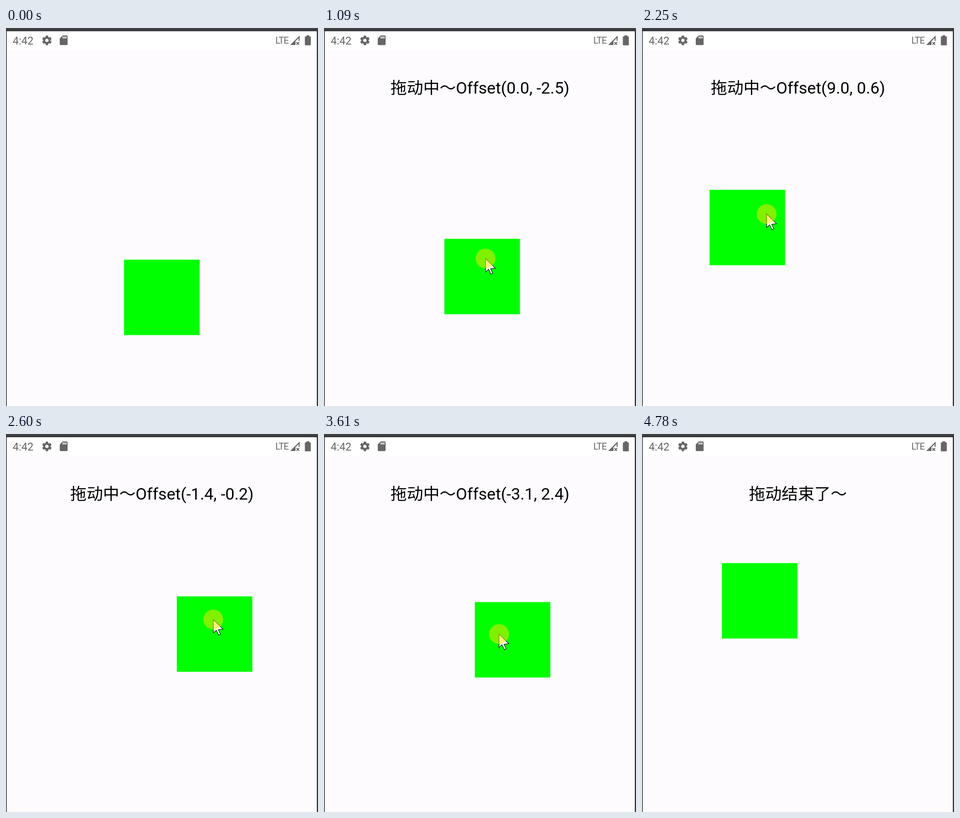
Animation, 679 px wide and 824 px high, one loop 5.64 s. Source, as an HTML page with a canvas:

```html
<!DOCTYPE html>
<html lang="zh-CN">
<head>
<meta charset="utf-8">
<title>Drag demo</title>
<style>
  html, body { margin: 0; width: 100%; height: 100%; overflow: hidden; background: #fdfbfe; }
  canvas { display: block; width: 679px; height: 824px; }
</style>
</head>
<body>
<canvas id="stage" width="679" height="824"></canvas>
<script>
const ctx = document.getElementById('stage').getContext('2d');
const LOOP = 5640, START = 190, STEP = 68.5;
const SIZE = 164.4, GREY = '#666666';
const PACE = 6.75;    // pixels per step for each unit of reported offset
const LEAD = 0.55;    // steps by which the pointer runs ahead of the box

const first = { from: 11, to: 38, grip: [85, 51] };
const second = { from: 47, to: 62, grip: [66, 59] };

// Turning points of the box: step, x, y and the reported drag offset there.
const path = [
  [11, 257, 505, 0, 0],
  [13, 262, 459.6, 0, -2.5],
  [17.3, 365, 408, 0, -2.8],
  [22, 149, 328, -9.3, -0.5],
  [25, 71, 333, 0, 1],
  [27, 71, 338, 0, 0.5],
  [30, 147, 352.7, 9, 0.6],
  [33.5, 380, 355, 0, 0],
  [38, 348, 351, 0, 0],
  [47, 348, 351, 0, 0],
  [50, 301, 388, -5, 4],
  [53, 201, 417, -3, -1],
  [55, 203, 356, 3, -3.7],
  [62, 174, 281.4, 0, 0]
];

// Cubic Hermite curve through the turning points.
function boxAt(n) {
  const next = path.findIndex(key => key[0] > n);
  if (next < 0) return path[path.length - 1].slice(1, 3);
  if (next === 0) return path[0].slice(1, 3);
  const a = path[next - 1], b = path[next];
  const span = b[0] - a[0], u = (n - a[0]) / span, s = u * u * (3 - 2 * u);
  return [1, 2].map(k => a[k] * (1 - s) + b[k] * s +
    span * PACE * u * (1 - u) * ((1 - u) * a[k + 2] - u * b[k + 2]));
}

const mix = (a, b, u) => a.map((v, k) => v + (b[k] - v) * u);
const clamp = u => Math.max(0, Math.min(1, u));

function held(drag, n) {
  const ahead = Math.min(n + LEAD, drag.to);
  return boxAt(ahead).map((v, k) => v + drag.grip[k]);
}

function pointerAt(n) {
  if (n < first.from) {
    return mix([541, 812], held(first, first.from), 1 - (1 - n / first.from) ** 1.5);
  }
  if (n < second.from) {
    const reach = clamp((n - second.from + 2) / 2);
    return mix(held(first, n), held(second, second.from), reach);
  }
  if (n < second.to) return held(second, n);
  const leave = Math.max(0, (n - 63) / 3);
  return mix([266, 364], [654, 709], leave ** 2);
}

function label(n) {
  if (n < first.from) return '';
  if (n >= second.to || (n >= first.to && n < second.from)) return '拖动结束了～';
  const tiny = 1e-4, now = boxAt(n), before = boxAt(n - tiny);
  const offset = now.map((v, k) => ((v - before[k]) / tiny / PACE).toFixed(1));
  return `拖动中～Offset(${offset.join(', ')})`;
}

function rect(x, y, w, h, color) {
  ctx.fillStyle = color;
  ctx.fillRect(x, y, w, h);
}

function poly(points) {
  ctx.beginPath();
  points.forEach(([x, y]) => ctx.lineTo(x, y));
  ctx.closePath();
}

function disc(x, y, r, color) {
  ctx.fillStyle = color;
  ctx.beginPath();
  ctx.arc(x, y, r, 0, 7);
  ctx.fill();
}

function text(str, x, y, font, color, align = 'left', spacing = 0) {
  ctx.font = font;
  ctx.fillStyle = color;
  ctx.textAlign = align;
  ctx.letterSpacing = spacing + 'px';
  ctx.fillText(str, x, y);
  ctx.letterSpacing = '0px';
}

function gear(x, y) {
  disc(x, y, 7.7, GREY);
  for (let i = 0; i < 6; i++) {
    ctx.save();
    ctx.translate(x, y);
    ctx.rotate(i * Math.PI / 3);
    poly([[-3.4, -6], [-2.4, -10.4], [2.4, -10.4], [3.4, -6]]);
    ctx.fill();
    ctx.restore();
  }
  disc(x, y, 3.6, '#ffffff');
}

function card(x, y) {
  ctx.fillStyle = GREY;
  ctx.beginPath();
  ctx.moveTo(x + 6.5, y);
  ctx.arcTo(x + 17, y, x + 17, y + 21, 2);
  ctx.arcTo(x + 17, y + 21, x, y + 21, 2);
  ctx.arcTo(x, y + 21, x, y + 6, 2);
  ctx.lineTo(x, y + 6.5);
  ctx.closePath();
  ctx.fill();
  for (let i = 0; i < 3; i++) rect(x + 6.3 + i * 3.15, y + 2.3, 2, 4.2, '#ffffff');
}

function signal() {
  ctx.fillStyle = GREY;
  poly([[618.5, 37], [639, 16.5], [639, 28], [630, 28], [630, 37]]);
  ctx.fill();
  ctx.fillStyle = '#ffffff';
  poly([[631, 28], [636.8, 22], [636.8, 28]]);
  ctx.fill();
  ctx.strokeStyle = GREY;
  ctx.lineWidth = 2;
  ctx.beginPath();
  for (const d of [-3, 3]) {
    ctx.moveTo(635 - d, 30.5);
    ctx.lineTo(635 + d, 36.5);
  }
  ctx.stroke();
}

function battery() {
  rect(653.8, 16, 6.2, 4, GREY);
  ctx.beginPath();
  ctx.roundRect(650.4, 18.2, 13, 19.6, 1.6);
  ctx.fill();
}

function phone() {
  rect(0, 0, 679, 824, '#fdfbfe');
  rect(0, 7, 679, 40, '#ffffff');
  text('4:42', 14.5, 36, '23.5px Roboto, sans-serif', GREY);
  gear(89, 27);
  card(117, 16.3);
  text('LTE', 586.2, 34, '20px Roboto, sans-serif', GREY, 'left', -1);
  signal();
  battery();
}

function bezel() {
  rect(0, 0, 679, 6, '#3c3f41');
  rect(0, 6, 679, 1, '#222426');
  rect(0, 7, 1.5, 817, '#2b2d2f');
  rect(676.5, 7, 2.5, 817, '#2b2d2f');
}

function pointer(x, y) {
  ctx.save();
  ctx.translate(x, y);
  poly([[0, 0], [0, 29.5], [6.6, 23.6], [11.6, 34], [15.6, 32.2], [11, 22.2], [21.3, 21.3]]);
  ctx.fillStyle = '#ffffff';
  ctx.fill();
  ctx.strokeStyle = '#000000';
  ctx.lineWidth = 1.1;
  ctx.stroke();
  disc(0, 0, 21.5, 'rgba(255, 228, 0, 0.5)');
  ctx.restore();
}

function draw(time) {
  const n = Math.floor((time - START + 2.5) / STEP);
  const [x, y] = boxAt(n);
  phone();
  text(label(n), 339.4, 143, '35.6px Roboto, "Noto Sans CJK SC", "Noto Sans CJK", sans-serif', '#000000', 'center');
  rect(x, y, SIZE, SIZE, '#00ff00');
  if (n >= 0 && n < 67) pointer(...pointerAt(n));
  bezel();
}

const begin = performance.now();
function tick() {
  draw((performance.now() - begin) % LOOP);
  requestAnimationFrame(tick);
}
tick();
</script>
</body>
</html>
```
